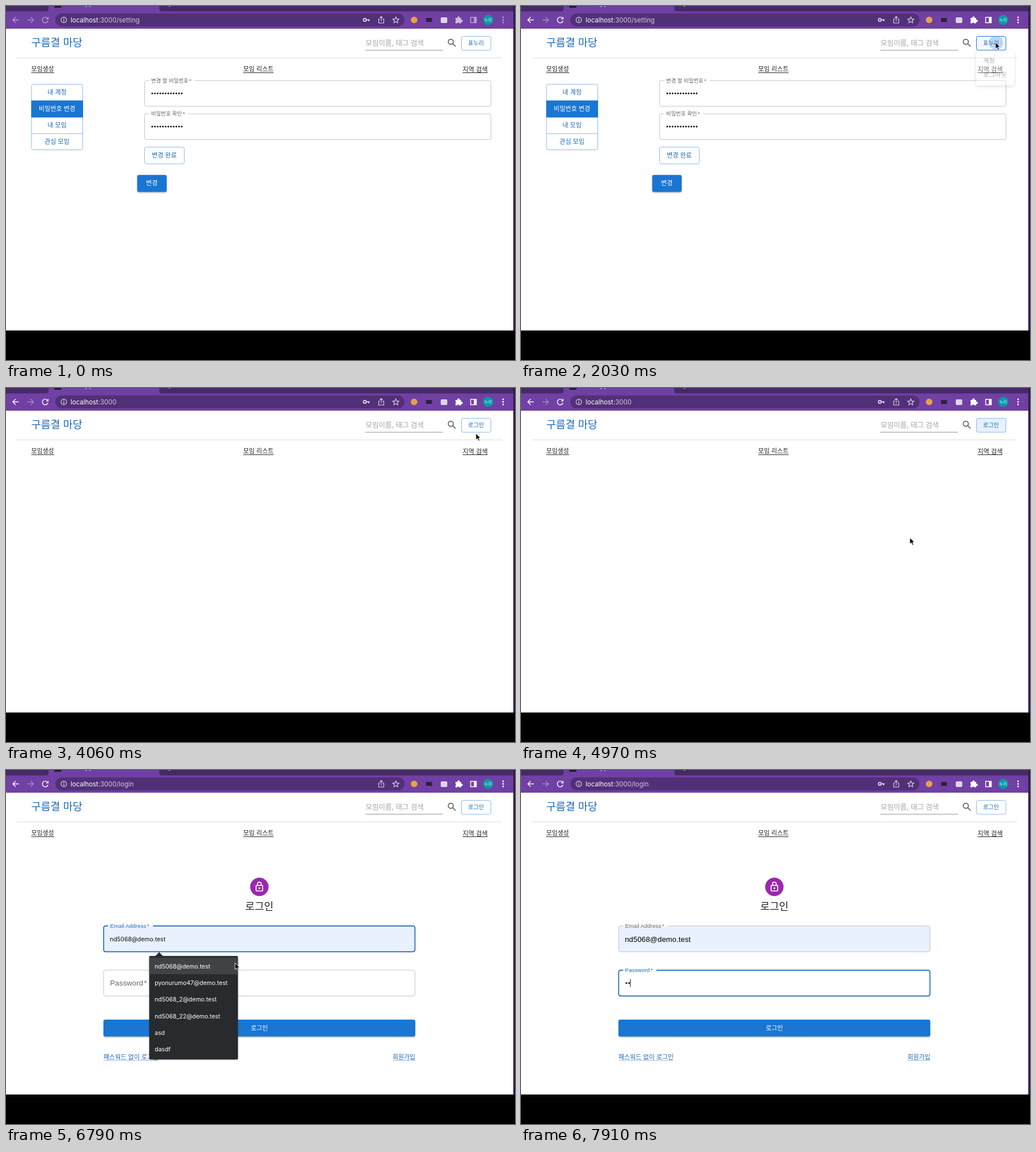
Write an HTML page that moves like this. It is 898 px wide and 624 px high and loops after 8 s.

```html
<!DOCTYPE html>
<html lang="ko">
<head>
<meta charset="utf-8">
<style>
html, body { margin: 0; width: 100%; height: 100%; overflow: hidden; background: #000; }
svg { display: block; width: 100%; height: 100%; }
text { font-family: 'Noto Sans CJK KR', 'Noto Sans CJK', sans-serif; white-space: pre; }
.latin { font-family: 'Liberation Sans', Arial, sans-serif; }
.ui { font-family: Inter, 'Noto Sans CJK KR', sans-serif; }
</style>
</head>
<body>
<svg id="stage" viewBox="0 0 898 624"></svg>
<script>
const LOOP = 8000;
const BLUE = '#1976d2', LINK = '#1c69b8', INK = '#212121', GREY = '#666', LINE = '#c4c4c4', SOFT = '#8cbae8';
const EMAIL = 'nd5068@demo.test';
const USER = '표누리';

// Moments at which the state of the page switches
const AT = {
  active: 980, menu: 1965, hand: 2640, home: 3010, login: 5040, popup: 5810,
  preview: 6560, accept: 6980, password: 7430, type: [7760, 7900]
};

const POINTER = [
  [700, 894, 560], [1250, 870, 330], [1800, 837, 64], [2060, 837, 64], [2590, 832, 128],
  [3290, 832, 128], [3650, 812, 180], [4060, 829, 80], [4400, 830, 65], [4640, 830, 65],
  [4900, 700, 262], [5400, 444, 295], [6230, 444, 295], [6560, 408, 335], [6790, 404, 340],
  [7140, 404, 340], [7400, 420, 376]
];

const clamp = v => Math.max(0, Math.min(1, v));
const smooth = p => p * p * (3 - 2 * p);

// cubic-bezier(.4, 0, .2, 1)
function ease(p) {
  p = clamp(p);
  let lo = 0, hi = 1, u = .5;
  for (let i = 0; i < 18; i++) {
    u = (lo + hi) / 2;
    const x = 1.2 * (1 - u) ** 2 * u + .6 * (1 - u) * u * u + u ** 3;
    if (x < p) lo = u; else hi = u;
  }
  return u * u * (3 - 2 * u);
}

// Text is placed by the vertical centre of its capitals
const text = (x, cy, s, size, fill, extra = '') =>
  `<text x="${x}" y="${cy + .36 * size}" font-size="${size}" fill="${fill}" ${extra}>${s}</text>`;
const centred = (x, cy, s, size, fill, extra = '') => text(x, cy, s, size, fill, 'text-anchor="middle" ' + extra);
const rect = (x, y, w, h, fill, extra = '') =>
  `<rect x="${x}" y="${y}" width="${w}" height="${h}" fill="${fill}" ${extra}/>`;
const circle = (x, y, r, fill, extra = '') => `<circle cx="${x}" cy="${y}" r="${r}" fill="${fill}" ${extra}/>`;
const path = (d, fill, extra = '') => `<path d="${d}" fill="${fill}" ${extra}/>`;
const stroke = (d, color, width = 1.4, extra = '') =>
  path(d, 'none', `stroke="${color}" stroke-width="${width}" ${extra}`);
const box = (x, y, w, h, color, width = 1, fill = 'none') =>
  rect(x, y, w, h, fill, `rx="3.3" stroke="${color}" stroke-width="${width}"`);
const group = (transform, content, extra = '') => `<g transform="${transform}" ${extra}>${content}</g>`;
const link = (x, cy, s, size, width, color, under = color) =>
  text(x, cy, s, size, color) + rect(x, cy + 5.6, width, 1, under);
const solidButton = (x, y, w, h) =>
  rect(x, y + 1.6, w, h, '#000', 'rx="3.3" opacity=".28" filter="url(#soft)"') + rect(x, y, w, h, BLUE, 'rx="3.3"');

function ripple(t, start, x, y, color, clip) {
  const dt = t - start;
  if (dt < 0 || dt > 650) return '';
  const alpha = .26 * (1 - clamp((dt - 200) / 450));
  return circle(x, y, 60 * ease(dt / 550), color, `opacity="${alpha}" clip-path="url(#${clip})"`);
}

const DEFS = `<defs>
  <filter id="soft" x="-30%" y="-30%" width="160%" height="180%"><feGaussianBlur stdDeviation="1.2"/></filter>
  <filter id="shade" x="-30%" y="-30%" width="160%" height="160%"><feGaussianBlur stdDeviation="4"/></filter>
  <clipPath id="inButton"><rect x="803.5" y="53.5" width="52" height="24.5" rx="3.3"/></clipPath>
  <clipPath id="inItem"><rect x="803" y="114" width="72.5" height="29.5"/></clipPath>
</defs>`;

function browser(t) {
  const on = t >= AT.active ? '#fff' : '#b79fd0', dim = '#a68bc4', pale = '#e4daee';
  const route = t < AT.home ? '/setting' : t < AT.login ? '' : '/login';
  const hasKey = t < AT.login || t >= AT.password;
  let s = rect(0, 0, 898, 40, '#452a67') + rect(0, 9.5, 898, 30.5, '#7040a4');
  s += path('M70 10q5 0 5-5V0H270.500V5q0 5 5 5z', '#7040a4');
  s += rect(85, 0, 13, 3, '#1d1d22', 'rx="1.500"') + text(140, -3.5, 'pp', 11, '#fff', 'class="ui"');
  s += rect(287, 0, 3, 1, '#c9bcd8');
  s += rect(87, 13, 616, 23, '#523078', 'rx="11.5"');
  s += stroke('M22.500 24.500H12.500M17 19.500l-5 5 5 5', on);
  s += stroke('M38 24.500H48M43.500 19.500l5 5-5 5', dim);
  s += stroke('M73.300 21.800A5 5 0 1 0 74 26', on) + path('M75 18.800v4.700h-4.700z', on);
  s += circle(102, 24.5, 4.9, 'none', `stroke="${pale}" stroke-width="1.1"`)
    + rect(101.4, 23.8, 1.3, 3.6, pale) + rect(101.4, 21.5, 1.3, 1.4, pale);
  s += text(114, 24.5, `localhost<tspan fill="#d3c6e0">:3000${route}</tspan>`, 11.45, '#fff', 'class="ui"');
  if (hasKey) {
    s += circle(633, 24.4, 2.5, 'none', `stroke="${pale}" stroke-width="1.700"`)
      + stroke('M635.500 24.400H641.500M639.700 24.400V27', pale, 1.8);
  }
  s += stroke('M659.500 23H657.500V30H666.500V23H664.500M662 27V18.700M659.500 21l2.500-2.500 2.500 2.500', pale, 1.1);
  const star = Array.from({ length: 10 }, (_, i) => {
    const r = i % 2 ? 2.6 : 5.8, a = i * Math.PI / 5;
    return [687.7 + r * Math.sin(a), 25 - r * Math.cos(a)].map(v => v.toFixed(1)).join(' ');
  });
  s += stroke(`M${star.join('L')}z`, pale, 1.1);
  s += circle(720, 24.5, 5.8, '#e5a345') + rect(741, 21, 10.5, 7, '#30203f', 'rx="1"')
    + rect(767, 20, 11.500, 10, '#ddd6e4', 'rx="2"');
  s += path('M793 21h3.500a2 2 0 1 1 3.700 0H803v3.400a2 2 0 1 1 0 3.600V30.500h-3.300a2 2 0 0 0-3.600 0H793v-3.400a2 2 0 0 0 0-3.300z', t < AT.active ? '#cdbddd' : '#fff');
  s += stroke('M819.700 20H829.700V29.500H819.700z', on, 1.4) + rect(825.5, 20, 4.5, 9.5, on);
  s += circle(850.7, 24.5, 9, '#0c97a8') + centred(850.7, 24.6, USER.slice(1), 7, '#fff');
  for (const dy of [-4.5, 0, 4.5]) s += circle(877, 24.5 + dy, 1.4, on);
  return s;
}

const SEARCH = 'M15.5 14h-.79l-.28-.27A6.5 6.5 0 1 0 13.73 14.430l.27.28v.79l5 5L20.500 19zM9.500 14a4.500 4.500 0 1 1 0-9 4.500 4.500 0 0 1 0 9z';

function header(t, pointer) {
  const hover = pointer && pointer.x > 803 && pointer.x < 856 && pointer.y > 53 && pointer.y < 78;
  let s = text(44.5, 64.5, '구름결 마당', 18.5, LINK);
  s += text(634.5, 65, '모임이름, 태그 검색', 12.5, '#a3a3a3') + rect(634, 77.5, 137, 1, '#8f8f8f');
  s += group('translate(777 55.300) scale(.82)', path(SEARCH, '#5f5f5f'));
  s += box(803.5, 53.5, 52, 24.5, hover ? BLUE : SOFT, 1, hover ? '#f5f9fd' : '#fff');
  s += centred(829.2, 65, t < AT.home ? USER : '로그인', 10.2, LINK, 'font-weight="500"');
  s += ripple(t, 1900, 838, 65, BLUE, 'inButton') + ripple(t, 4500, 830, 65, BLUE, 'inButton');
  s += rect(19, 91, 856, 1, '#dedede');
  s += link(44.5, 111.5, '모임생성', 10.9, 40.5, INK) + link(418.5, 111.5, '모임 리스트', 11, 53.5, INK);
  return s + link(805.5, 111.5, '지역 검색', 11.2, 44, INK);
}

function field(x, y, w, label, notch, { focus = false, fill = 'none', korean = false } = {}) {
  const color = focus ? LINK : LINE, size = korean ? 9.4 : 9.8;
  let s = box(x, y, w, 45.5, color, focus ? 1.7 : 1, fill);
  if (label) {
    s += rect(x + 8, y - 1.2, notch, 2.4, '#fff');
    s += text(x + 11.5, y, label, size, focus ? LINK : GREY, korean ? '' : 'class="latin" letter-spacing=".08"');
  }
  return s;
}

const dots = (x, cy, count) =>
  Array.from({ length: count }, (_, i) => circle(x + i * 4.72, cy, 1.55, '#111')).join('');

function settings() {
  let s = box(45, 138, 90.5, 115.5, SOFT) + rect(45, 224.5, 90.5, 1, SOFT) + rect(44.5, 166.5, 91.5, 30, BLUE);
  ['내 계정', '비밀번호 변경', '내 모임', '관심 모임'].forEach((label, i) => {
    s += centred(90, 152.5 + i * 28.9, label, 11.1, i === 1 ? '#fff' : LINK, 'font-weight="500"');
  });
  const star = '<tspan class="latin" dx="1.500">*</tspan>';
  s += field(244.5, 131.3, 611, '변경 할 비밀번호' + star, 80, { korean: true }) + dots(258, 154, 12);
  s += field(244.5, 190, 611, '비밀번호 확인' + star, 69, { korean: true }) + dots(258, 212.5, 12);
  s += box(244.5, 248.7, 70, 29.5, SOFT) + centred(279.2, 263.3, '변경 완료', 11.1, LINK, 'font-weight="500"');
  return s + solidButton(231.5, 297.7, 52, 30) + centred(257.3, 312.5, '변경', 11.1, '#fff', 'font-weight="500"');
}

function menu(t) {
  const scale = .75 + .25 * ease((t - AT.menu) / 148);
  const hovered = t >= 2480;
  let s = rect(803, 81, 72.5, 72, '#000', 'rx="3.3" opacity=".33" filter="url(#shade)"');
  s += rect(803, 78.5, 72.5, 72, '#fff', 'rx="3.3"');
  if (hovered) s += rect(803, 114, 72.5, 29.5, '#f4f4f4');
  s += ripple(t, 2810, 832, 128, '#000', 'inItem');
  s += text(816, 99, '계정', 12.5, INK) + text(816.5, 128.3, '로그아웃', 12.3, INK);
  return group(`translate(803 78) scale(${scale} ${scale * scale}) translate(-803 -78)`, s,
    `opacity="${ease((t - AT.menu) / 222)}"`);
}

const LOCK = 'M12 17a2 2 0 1 0 0-4 2 2 0 0 0 0 4zM18 8h-1V6A5 5 0 0 0 7 6v2H6a2 2 0 0 0-2 2v10a2 2 0 0 0 2 2h12a2 2 0 0 0 2-2V10a2 2 0 0 0-2-2zM8.900 6a3.100 3.100 0 0 1 6.200 0v2H8.900zM18 20H6V10h12z';

function login(t) {
  const filled = t >= AT.preview, onPassword = t >= AT.password;
  const caret = x => rect(x, 0, 1, 14, '#111');
  let s = circle(447, 206, 16.2, '#9c27b0');
  s += group('translate(437.160 196) scale(.82)', path(LOCK, '#fff', 'fill-rule="evenodd"'));
  s += centred(447, 240.7, '로그인', 18.1, INK);

  s += field(172.3, 274.8, 549.2, 'Email Address<tspan dx="1.500">*</tspan>', onPassword ? 78 : 79,
    { focus: !onPassword, fill: filled ? '#e8f1fd' : 'none' });
  if (t >= AT.accept) s += text(183.2, 297.8, EMAIL, 13.1, '#000', 'class="latin" letter-spacing=".12"');
  else if (filled) s += text(183.2, 298.3, EMAIL, 10.5, '#111', 'class="ui"');
  else if ((t - 5140 + 1000) % 1000 < 500) s += group('translate(0 290.500)', caret(183.2));

  // The password label shrinks onto the border when the field gains focus
  const shrink = ease((t - AT.password) / 200);
  s += field(172.3, 352.8, 549.2, '', 0, { focus: onPassword });
  if (onPassword) s += rect(180.3, 351.6, 58.5 * shrink, 2.4, '#fff');
  s += text(183.5, 375.3 - 22.5 * shrink, 'Password<tspan dx="1.500">*</tspan>', 13.1 - 3.3 * shrink,
    onPassword ? LINK : GREY, 'class="latin" letter-spacing=".11"');
  if (onPassword) {
    const typed = AT.type.filter(at => t >= at).length;
    s += dots(186, 375.5, typed);
    if (typed || t - AT.password < 500) s += group('translate(0 368.500)', caret(183.2 + 4.6 * typed));
  }

  s += solidButton(172, 440, 550, 29.7) + centred(447, 454.7, '로그인', 10.9, '#fff', 'font-weight="500"');
  s += link(172, 505.8, '패스워드 없이 로그인', 11, 96.5, LINK, '#91b5dc');
  return s + link(682, 505.8, '회원가입', 10.9, 40, LINK, '#91b5dc');
}

function suggestions(t) {
  const rows = [EMAIL, 'pyonurumo47@demo.test', 'nd5068_2@demo.test', 'nd5068_22@demo.test', 'asd', 'dasdf'];
  const hovered = t >= AT.preview;
  let s = rect(252.7, 329, 156.5, 182, '#000', 'rx="2" opacity=".3" filter="url(#soft)"');
  s += path('M263.500 328l6.700-7 6.700 7z', '#272b2e') + rect(252.7, 327.7, 156.5, 182.5, '#272b2e', 'rx="2"');
  if (hovered) s += rect(252.7, 330.7, 156.5, 29.3, '#3f4346');
  rows.forEach((row, i) => s += text(262.3, 345.9 + i * 29.3, row, 10.5, '#fff', 'class="ui"'));
  return s;
}

function pointerAt(t) {
  if (t < POINTER[0][0] || t >= AT.type[0]) return null;
  const next = POINTER.findIndex(key => key[0] > t);
  if (next < 0) { const [, x, y] = POINTER.at(-1); return { x, y }; }
  const [t0, x0, y0] = POINTER[next - 1], [t1, x1, y1] = POINTER[next];
  const p = smooth((t - t0) / (t1 - t0));
  return { x: x0 + (x1 - x0) * p, y: y0 + (y1 - y0) * p };
}

function cursor(t, { x, y }) {
  const within = (from, to) => t >= from && t < to;
  let shape = path('M0 0V11.500L2.700 9 4.700 13.300 6.700 12.400 4.800 8.300H8.300z', '#000', 'stroke="#fff" stroke-width=".9"');
  if (within(AT.hand, AT.home) || within(4330, 4680)) {
    shape = path('M-1 0q1.200-1 2 .3L2.200 4.500 3.600 4.300 5.200 4.900 7 5.600 7.400 8.500 6.300 12.500H.800L-3.200 7.600q0-1.500 1.500-1L-.300 7.700z',
      '#fff', 'stroke="#000" stroke-width="1" stroke-linejoin="round"') + stroke('M2 7.700v3M3.700 7.700v3M5.300 7.700v3', '#000', .6);
  } else if (within(5340, 6440) || t >= 7260) {
    shape = stroke('M-2.500-6Q0-6 0-4.500 0-6 2.500-6M0-4.500V4.500M-2.500 6Q0 6 0 4.500 0 6 2.500 6M-1.300 2H1.300', '#111', 1.1);
  }
  return group(`translate(${x.toFixed(2)} ${y.toFixed(2)})`, shape);
}

function scene(t) {
  const pointer = pointerAt(t);
  let s = DEFS + rect(0, 0, 898, 624, '#000') + rect(0, 39.5, 898, 532.5, '#fff');
  s += browser(t) + header(t, pointer);
  if (t < AT.home) s += settings();
  if (t >= AT.menu && t < AT.home) s += menu(t);
  if (t >= AT.login) s += login(t);
  if (t >= AT.popup && t < AT.accept) s += suggestions(t);
  s += rect(895, 0, 3, 572, '#35194f');
  return s + (pointer ? cursor(t, pointer) : '');
}

const stage = document.getElementById('stage');
let shown = '';
function frame() {
  const next = scene(performance.now() % LOOP);
  if (next !== shown) stage.innerHTML = shown = next;
  requestAnimationFrame(frame);
}
frame();
</script>
</body>
</html>
```
